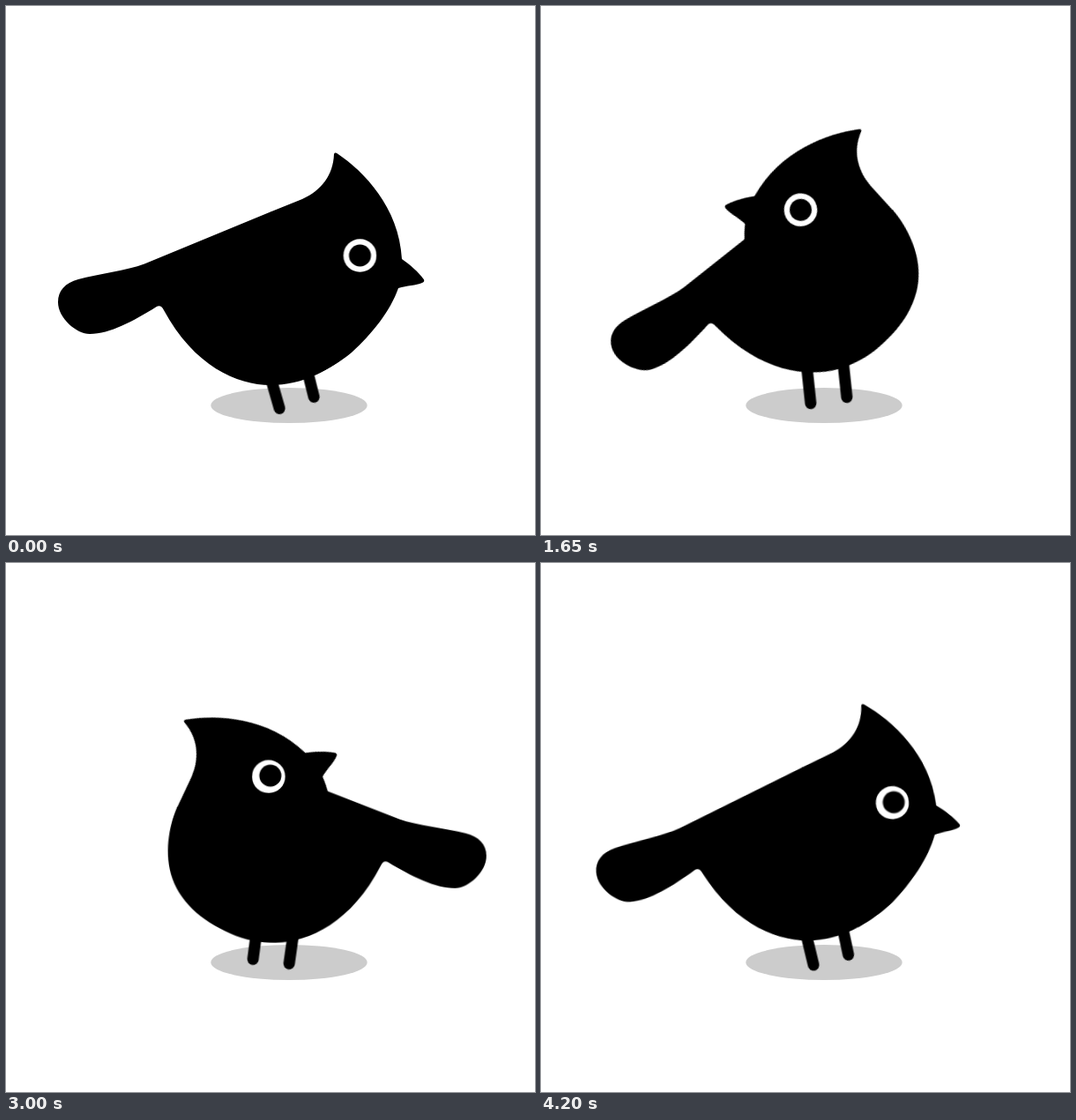
Animation of 600x600 px, one loop 4250 ms. Source, as an HTML page without scripts:

```html
<!DOCTYPE html>
<html lang="en">
<head>
<meta charset="utf-8">
<title>Hopping bird</title>
<style>
html, body { margin: 0; width: 100%; height: 100%; overflow: hidden; background: #fff; }
svg { display: block; width: 100vw; height: 100vh; }

.side, .bird, .head, .eye, .pupil, .open, .shut, .leg {
  animation: 4250ms step-end infinite;
}
.side { animation-name: side; }
.bird { animation-name: tilt; transform-origin: 276px 291px; }
.head { animation-name: look; }
.eye { animation-name: eye; }
.pupil { animation-name: pupil; }
.open { animation-name: open; }
.shut { animation-name: shut; }
.back { animation-name: back-leg; }
.front { animation-name: front-leg; }

.leg { stroke: #000; stroke-width: 13; stroke-linecap: round; }

/* which way the body faces */
@keyframes side {
  0%, 79.99%, 100% { transform: none; }
  41.17% { transform: matrix(-1, 0, 0, 1, 605, 0); }
}

/* lean and hop of the body */
@keyframes tilt {
  0%, 100% { transform: translate(0, 0) rotate(0deg); }
  9.41% { transform: translate(0, 0) rotate(-16deg); }
  29.41% { transform: translate(0, 0) rotate(-16deg); }
  38.82% { transform: translate(.5px, -6.5px) rotate(-16deg); }
  39.99% { transform: translate(.5px, -14px) rotate(-15deg); }
  41.17% { transform: translate(0, -14px) rotate(-13deg); }
  42.35% { transform: translate(0, -7px) rotate(-14deg); }
  43.52% { transform: translate(-.8px, -1px) rotate(-16deg); }
  55.29% { transform: translate(-.8px, -1.2px) rotate(-8.7deg); }
  56.47% { transform: translate(0, -.5px) rotate(-3deg); }
  57.64% { transform: translate(0, 0) rotate(0deg); }
  70.58% { transform: translate(2px, .3px) rotate(1.1deg); }
  78.82% { transform: translate(0, -6px) rotate(-5deg); }
  79.99% { transform: translate(0, -11px) rotate(-14deg); }
  81.17% { transform: translate(0, -6px) rotate(-16deg); }
  82.35% { transform: translate(0, 1px) rotate(-17deg); }
  83.52% { transform: translate(0, 2px) rotate(-16.6deg); }
  84.7% { transform: translate(0, 1px) rotate(-16.3deg); }
  85.88%, 90.58% {
    transform: translate(0, 0) rotate(-16deg);
    animation-timing-function: cubic-bezier(.36, 0, .68, .3);
  }
}

/* head turned over the shoulder */
@keyframes look {
  0%, 41.17%, 79.99%, 100% { transform: none; }
  29.41%, 70.58% { transform: matrix(-.7455, -.6665, -.6665, .7455, 788, 300.6); }
}
@keyframes eye {
  0%, 100% { transform: translate(401.5px, 283px); }
  29.41% { transform: translate(308px, 244.8px); }
  41.17% { transform: translate(386.5px, 279px); }
  70.58% { transform: translate(304.2px, 241.4px); }
  79.99% { transform: translate(399.6px, 280.4px); }
}
@keyframes pupil {
  0%, 100% { transform: translate(0, 0); }
  70.58% { transform: translate(-2px, -1px); }
  71.76% { transform: translate(-4px, -2px); }
  72.94% { transform: translate(-5.5px, -3px); }
  79.99%, 90.58% {
    transform: translate(6.2px, -1.7px);
    animation-timing-function: cubic-bezier(.36, 0, .68, .3);
  }
}

/* blink */
@keyframes open {
  0%, 25.88%, 100% { opacity: 1; }
  22.35% { opacity: 0; }
}
@keyframes shut {
  0%, 25.88%, 100% { opacity: 0; }
  22.35% { opacity: 1; }
}

@keyframes back-leg {
  0%, 100% { transform: translate(310.5px, 457.5px) rotate(-16deg); }
  9.41% { transform: translate(306px, 455.5px) rotate(-6deg); }
  38.82% { transform: translate(306px, 451.8px) rotate(-6deg); }
  39.99% { transform: translate(306px, 445px) rotate(-6deg); }
  41.17% { transform: translate(283px, 445px) rotate(0deg); }
  42.35% { transform: translate(283px, 450px) rotate(-1deg); }
  43.52% { transform: translate(283.5px, 455px) rotate(-2deg); }
  55.29% { transform: translate(282px, 453px) rotate(2deg); }
  56.47% { transform: translate(281px, 451.5px) rotate(5deg); }
  57.64% { transform: translate(280px, 450.5px) rotate(7.5deg); }
  78.82% { transform: translate(281px, 447px) rotate(5deg); }
  79.99% { transform: translate(307px, 444px) rotate(-6deg); }
  81.17% { transform: translate(307px, 445px) rotate(-5deg); }
  82.35% { transform: translate(307.3px, 448px) rotate(-4deg); }
  83.52% { transform: translate(306.5px, 453px) rotate(-5deg); }
  84.7%, 90.58% {
    transform: translate(306px, 455.5px) rotate(-6deg);
    animation-timing-function: cubic-bezier(.36, 0, .68, .3);
  }
}
@keyframes front-leg {
  0%, 100% { transform: translate(349.5px, 444.5px) rotate(-14deg); }
  9.41% { transform: translate(347px, 448.5px) rotate(-6deg); }
  38.82% { transform: translate(347px, 444.8px) rotate(-6deg); }
  39.99% { transform: translate(347px, 438px) rotate(-6deg); }
  41.17% { transform: translate(325px, 441px) rotate(0deg); }
  42.35% { transform: translate(325.5px, 446px) rotate(-1deg); }
  43.52% { transform: translate(326px, 451px) rotate(-2deg); }
  55.29% { transform: translate(323.5px, 453px) rotate(2deg); }
  56.47% { transform: translate(322px, 454.5px) rotate(5deg); }
  57.64% { transform: translate(321px, 455.5px) rotate(8deg); }
  78.82% { transform: translate(322px, 451px) rotate(5deg); }
  79.99% { transform: translate(348px, 438px) rotate(-6deg); }
  81.17% { transform: translate(348px, 439px) rotate(-5deg); }
  82.35% { transform: translate(348.2px, 442px) rotate(-4deg); }
  83.52% { transform: translate(347.5px, 446px) rotate(-5deg); }
  84.7%, 90.58% {
    transform: translate(347px, 448.5px) rotate(-6deg);
    animation-timing-function: cubic-bezier(.36, 0, .68, .3);
  }
}
</style>
</head>
<body>
<svg viewBox="0 0 600 600">
  <ellipse cx="321" cy="453" rx="88.7" ry="20" fill="#ccc"/>
  <line class="leg back" y1="-1" y2="-45"/>
  <line class="leg front" y1="-1" y2="-45"/>
  <g class="side">
    <g class="bird">
      <path d="M59 336C59 323 67 314 82 310C105 304 137 300 157 292.5L300 233.5L408.5 274C416 289 425 322 417 350C409 380 385 403 351 418.5C335 426 318 430 300 430C262 430 213 408 179 345C177 340.5 174 339 170 341.5C145 357 118 372 95 372C80 372 59 354 59 336Z"/>
      <path class="head" d="M372 168Q373 165.5 376 167.5C405 187 446 228 449 287C458 293 468 302 473 309Q476 312 472 314C465 317 455 317 445 320C436 346 415 372 392 393C380 403 365 412 351 418.5L300 300V233.5L336 219C358 209 371 192 372 168Z"/>
      <g class="eye">
        <g class="open">
          <circle r="18.8" fill="#fff"/>
          <circle class="pupil" r="12.5"/>
        </g>
        <path class="shut" d="M-15 -4C-13 10.5 13 10.5 15 -5" transform="rotate(16)" fill="none" stroke="#fff" stroke-width="5.5"/>
      </g>
    </g>
  </g>
</svg>
</body>
</html>
```
